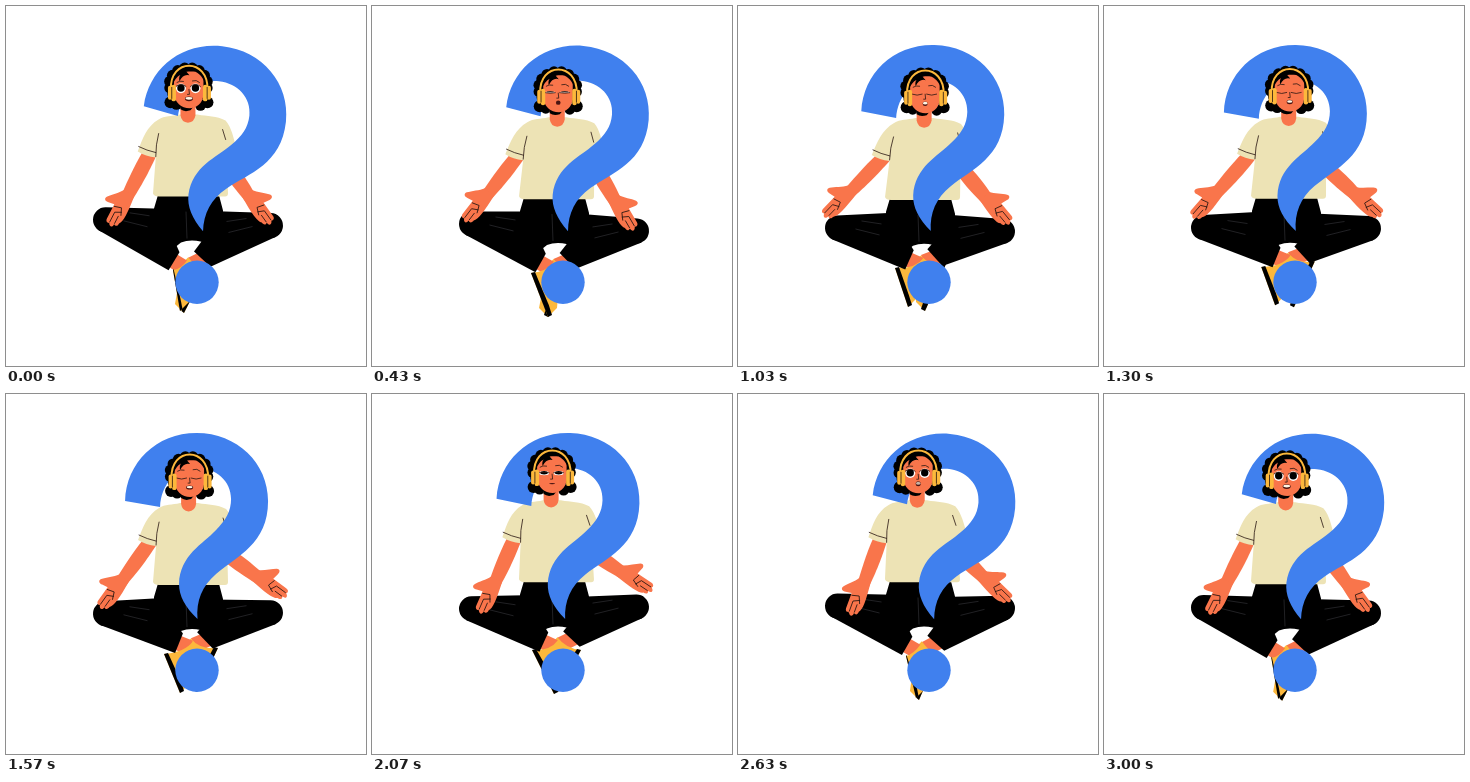
Recreate the animation shown at these times as an HTML page. Size 360 by 360 pixels, loop 3030 ms.

```html
<!DOCTYPE html>
<html lang="en">
<head>
<meta charset="utf-8">
<title>Question</title>
<style>
html, body { margin: 0; width: 100%; height: 100%; overflow: hidden; background: #fff; }
svg { display: block; width: 100vw; height: 100vh; }
.skin { fill: #f9754b; }
.gold { fill: #fcb83c; }
.blue { fill: #4080ee; }
.shirt { fill: #ede3b5; }
.line { fill: none; stroke: #2a1712; stroke-width: .8; stroke-linecap: round; }
.thigh { fill: none; stroke: #000; stroke-width: 25; stroke-linecap: round; }
.fold { fill: none; stroke: #303034; stroke-width: .7; }
.ankle { fill: none; stroke: #f9754b; stroke-width: 15; }
</style>
</head>
<body>
<svg viewBox="0 0 360 360">
  <defs>
    <g id="hand">
      <path class="skin" d="M-6 -4 C-9 1 -15 6 -18 10 C-20 13 -17 15 -14 14 L-8 13 L-8 29 C-8 33 -5 33 -4 32 C-2 36 1 35 1 31 C4 33 5 30 5 28 C8 25 8 15 6 -4Z"/>
      <path class="line" d="M-7 15 L0 13 L3 20 M-4 31 L-4 20 L2 17 M1 30 L1 22"/>
    </g>
  </defs>

  <g id="feet">
    <path id="ankleR" class="ankle"/>
    <path id="shoeR" class="gold"/>
    <path id="soleR"/>
    <path id="ankleL" class="ankle"/>
    <path id="shoeL" class="gold"/>
    <path id="soleL"/>
  </g>

  <g id="legs">
    <path id="shinL"/>
    <path id="shinR"/>
    <path id="thighL" class="thigh"/>
    <path id="thighR" class="thigh"/>
    <path id="foldL" class="fold"/>
    <path id="foldR" class="fold"/>
    <g id="hips">
      <path d="M153 186 H212 L217 205 L217 239 L202 239 Q195 235 186 235 Q180 235 175 237 L170 241 L159 241 L148 224 L148 203Z"/>
      <path class="fold" d="M180 206 L181 233"/>
    </g>
  </g>

  <g id="torso">
    <g id="armL">
      <path class="skin" d="M-6 -8 L7 -8 C8 15 8 25 6 48 L-6 48 C-7 30 -8 12 -6 -8Z"/>
      <use href="#hand" y="47"/>
    </g>
    <path class="skin" d="M215 142 L228 142 L230 162 L218 164Z"/>
    <g id="armR">
      <path class="skin" d="M-7 -6 L7 -6 C8 12 8 20 6 38 L-6 38 C-7 25 -8 12 -7 -6Z"/>
      <use href="#hand" transform="translate(0 36) scale(-1 1)"/>
    </g>
    <path class="shirt" d="M174 109 C166 111 159 110 153 114 C141 121 137 133 132 146 Q140 151 150 152 L147 188 Q148 191 153 191 H219 Q222 191 222 188 L221 148 L231 145 C228 132 226 122 220 115 C211 110 202 111 192 109Z"/>
    <path class="line" d="M133 141 Q141 145 150 147 M153 128 Q150 139 150 151 M217 124 L220 134"/>
  </g>

  <path id="mark" class="blue" d="M119 107 C120 69 150 39 190.500 39 C231 39 262 69 262 107 C262 150 231 162 210 180 C196 192 190 207 191.500 225 C179 213 173 202 173 190 C174 161 197 150 210 136 C220 126 225 117 225 105 C225 87 210 74 191 74 C170 74 155 90 154 113Z"/>

  <g id="head">
    <g id="hair"><ellipse cx="183" cy="79" rx="20" ry="18"/></g>
    <path class="skin" d="M175 94 H190 V110 Q189 117 182.500 117.500 Q176 117 175 110Z"/>
    <path d="M174 98 L190 99 L185 105 Q179 107 175 104Z"/>
    <path class="skin" d="M168.500 74 C171 60 196 60 198 74 L198 90 C197 98 191 103 184 103 C176 103 169 97 168.500 88Z"/>
    <path d="M167 80 C166 68 174 61.500 184 61.500 C194 61.500 201 68 200 80 C198 73 195 69 190 66.500 C187 66 184 66 181 66.500 L184 70 Q178 68 174 76 Q173 72 175 69.500 Q170 72 167 80Z"/>
    <path class="line" stroke-width="1" d="M171.500 77 Q174 75 178 76 M187 75.500 Q191 74 194 77"/>
    <g id="eyes"></g>
    <path class="line" d="M183.500 84 L184 89 L182 89"/>
    <ellipse id="mouth" cx="183.500" cy="93.500" fill="#4b1512"/>
    <ellipse id="teeth" cx="183.500" cy="93" fill="#fff6e4"/>
    <path d="M165.500 84 C164 52.500 203 52.500 202 84" fill="none" stroke="#fcb83c" stroke-width="2"/>
    <rect class="gold" x="162.500" y="80.500" width="4" height="14" rx="2"/>
    <rect class="gold" x="166" y="79.500" width="4.500" height="16.500" rx="2.200"/>
    <rect class="gold" x="197.500" y="79.500" width="4.500" height="16.500" rx="2.200"/>
    <rect class="gold" x="201.500" y="80.500" width="4" height="14" rx="2"/>
    <path class="line" d="M166.300 82 V93 M201.700 82 V93" stroke-width=".5"/>
  </g>

  <circle id="dot" class="blue" cx="191" cy="276.300" r="21.700"/>
</svg>

<script>
const LOOP = 3030;
const SVG = "http://www.w3.org/2000/svg";
const BEATS = [0, 430, 1030, 1570, 2070, 2630];
const $ = id => document.getElementById(id);
const set = (id, name, value) => $(id).setAttribute(name, value);
const mix = (a, b, k) => a + (b - a) * k;

function add(parent, tag, attrs) {
  const node = document.createElementNS(SVG, tag);
  for (const name in attrs) node.setAttribute(name, attrs[name]);
  return $(parent).appendChild(node);
}

// Periodic Hermite curve through one value per beat.
function curve(values, t) {
  const n = BEATS.length;
  const time = i => BEATS[(i + n) % n] + LOOP * Math.floor(i / n);
  const value = i => values[(i + n) % n];
  const slope = i => (value(i + 1) - value(i - 1)) / (time(i + 1) - time(i - 1));
  let i = n - 1;
  while (BEATS[i] > t) i--;
  const span = time(i + 1) - time(i), u = (t - time(i)) / span;
  const ease = u * u * (3 - 2 * u);
  return mix(value(i), value(i + 1), ease)
    + span * u * (1 - u) * ((1 - u) * slope(i) - u * slope(i + 1));
}

function ramp(stops, t) {
  for (let i = 1; i < stops.length; i++) {
    const [t0, v0] = stops[i - 1], [t1, v1] = stops[i];
    if (t <= t1) return mix(v0, v1, (t - t0) / (t1 - t0));
  }
  return stops[stops.length - 1][1];
}

const FEET = {
  L: {
    heel: [[167, 159, 157, 158, 160, 168], [264, 267, 262, 260, 256, 262]],
    toe: [[174, 176, 170, 174, 182, 178], [305, 311, 301, 299, 300, 304]]
  },
  R: {
    heel: [[200, 198, 208, 212, 209, 200], [264, 264, 258, 254, 256, 262]],
    toe: [[178, 176, 187, 191, 186, 181], [307, 311, 305, 298, 298, 306]]
  }
};
const OPEN_EYES = [[0, 1], [180, 1], [430, .15], [520, 0], [1750, 0], [2070, .45], [2350, 1], [LOOP, 1]];
const MOUTH_W = [4, 2.3, 2.5, 3.5, 3, 2.5];
const MOUTH_H = [2.4, 2.2, 2.2, 2, .7, 2.5];
const TEETH = [1, 0, 1, 1, 0, .7];

for (let i = 0; i < 12; i++) {
  const a = (145 + i * 250 / 11) * Math.PI / 180;
  add("hair", "circle", { cx: 183 + 19 * Math.cos(a), cy: 79 + 16.5 * Math.sin(a), r: 5.6 });
}
for (const [cx, cy, r] of [[165, 97, 6], [171, 99, 5.5], [202, 97, 6], [195, 100, 5.5]])
  add("hair", "circle", { cx, cy, r });

const eyes = [175.5, 190].map(x => ({
  x,
  white: add("eyes", "ellipse", { cx: x, cy: 83, rx: 5, fill: "#fff" }),
  pupil: add("eyes", "ellipse", { cx: x, cy: 82.6, rx: 3.7 }),
  lid: add("eyes", "path", { class: "line" })
}));

// dir is +1 for a shin running right, -1 for left; skew slants the trouser hem.
function drawLeg(side, dir, knee, ankle, hip, skew, t, soleWidth) {
  const dx = ankle.x - knee.x, dy = ankle.y - knee.y, len = Math.hypot(dx, dy);
  const ux = dx / len, uy = dy / len;
  const at = (p, along, down) =>
    `${p.x + ux * along - dir * uy * down} ${p.y + uy * along + dir * ux * down}`;
  const [heel, toe] = ["heel", "toe"].map(k => {
    const [xs, ys] = FEET[side][k];
    return { x: curve(xs, t), y: curve(ys, t) };
  });
  set("thigh" + side, "d", `M${hip.x} ${hip.y} L${knee.x} ${knee.y}`);
  set("shin" + side, "d", `M${at(knee, 0, 12.5)} L${at(ankle, -skew, 10.5)} L${at(ankle, skew, -10.5)} L${hip.x + dir * -6} ${hip.y} L${knee.x} ${knee.y}Z`);
  set("ankle" + side, "d", `M${at(ankle, -6, 0)} L${at(ankle, 12, 0)}`);
  set("fold" + side, "d", `M${knee.x + dir * 24} ${knee.y - 7} L${knee.x + dir * 44} ${knee.y - 4} M${knee.x + dir * 18} ${knee.y + 1} L${knee.x + dir * 42} ${knee.y + 7}`);
  set("shoe" + side, "d", `M${heel.x} ${heel.y} L${toe.x} ${toe.y} L${toe.x + dir * 9} ${toe.y - 9} L${ankle.x + dir * 20} ${ankle.y + 4} L${ankle.x + dir * 14} ${ankle.y - 2} Q${ankle.x + dir * 6} ${ankle.y + 9} ${heel.x} ${heel.y}Z`);
  const end = Math.max(soleWidth, 2.5);
  set("sole" + side, "d", `M${heel.x} ${heel.y} L${toe.x} ${toe.y} l${dir * end} -2 L${toe.x + dir * end * .2} ${toe.y - 12} L${heel.x + dir * soleWidth} ${heel.y - 1}Z`);
}

function draw(t) {
  const phase = t / LOOP * 360;
  const wave = shift => Math.cos((phase - shift) * Math.PI / 180);
  const sway = wave(98);

  set("mark", "transform", `rotate(${3.12 * (1 + wave(0))} 191 276)`);
  set("torso", "transform", `matrix(1 0 ${-.045 * sway} 1 ${8.5 * sway} ${3.2 * sway})`);
  set("head", "transform", `translate(${4 * sway} ${4.6 * sway})`);
  set("hips", "transform", `translate(0 ${3 * sway})`);
  set("armL", "transform", `translate(143 149) rotate(${32 + 10.5 * wave(116)})`);
  set("armR", "transform", `translate(${223 + 2.5 * sway} ${162 + sway}) rotate(${-44 - 12.5 * wave(226)})`);

  const sole = Math.min(4, 6 * (1 - wave(335)));
  const hipY = 216 + 3 * sway;
  drawLeg("L", 1, { x: 99.5, y: 217 + 5 * wave(130) },
    { x: 170.5 + 2.5 * wave(190), y: 252.5 + 4.5 * wave(51) }, { x: 166, y: hipY }, 0, t, sole);
  drawLeg("R", -1, { x: 264.5, y: 219.5 + 7 * wave(90) },
    { x: 197.5 - 2 * wave(51), y: 250 + 5 * wave(51) }, { x: 203, y: hipY + 2 }, 4, t, sole);

  const open = ramp(OPEN_EYES, t);
  for (const { x, white, pupil, lid } of eyes) {
    white.setAttribute("ry", 4.8 * open);
    pupil.setAttribute("ry", 3.8 * open);
    const y = 84 - 5 * open;
    lid.setAttribute("d", `M${x - 5} ${y + open * 2} Q${x} ${y + 2 - 4 * open} ${x + 5} ${y + open * 2}`);
  }

  const w = curve(MOUTH_W, t), h = curve(MOUTH_H, t);
  set("mouth", "rx", w);
  set("mouth", "ry", h);
  set("teeth", "rx", w * .85);
  set("teeth", "ry", h * .6);
  set("teeth", "opacity", Math.min(1, Math.max(0, curve(TEETH, t))));
}

const start = performance.now();
function tick() {
  draw((performance.now() - start) % LOOP);
  requestAnimationFrame(tick);
}
tick();
</script>
</body>
</html>
```
